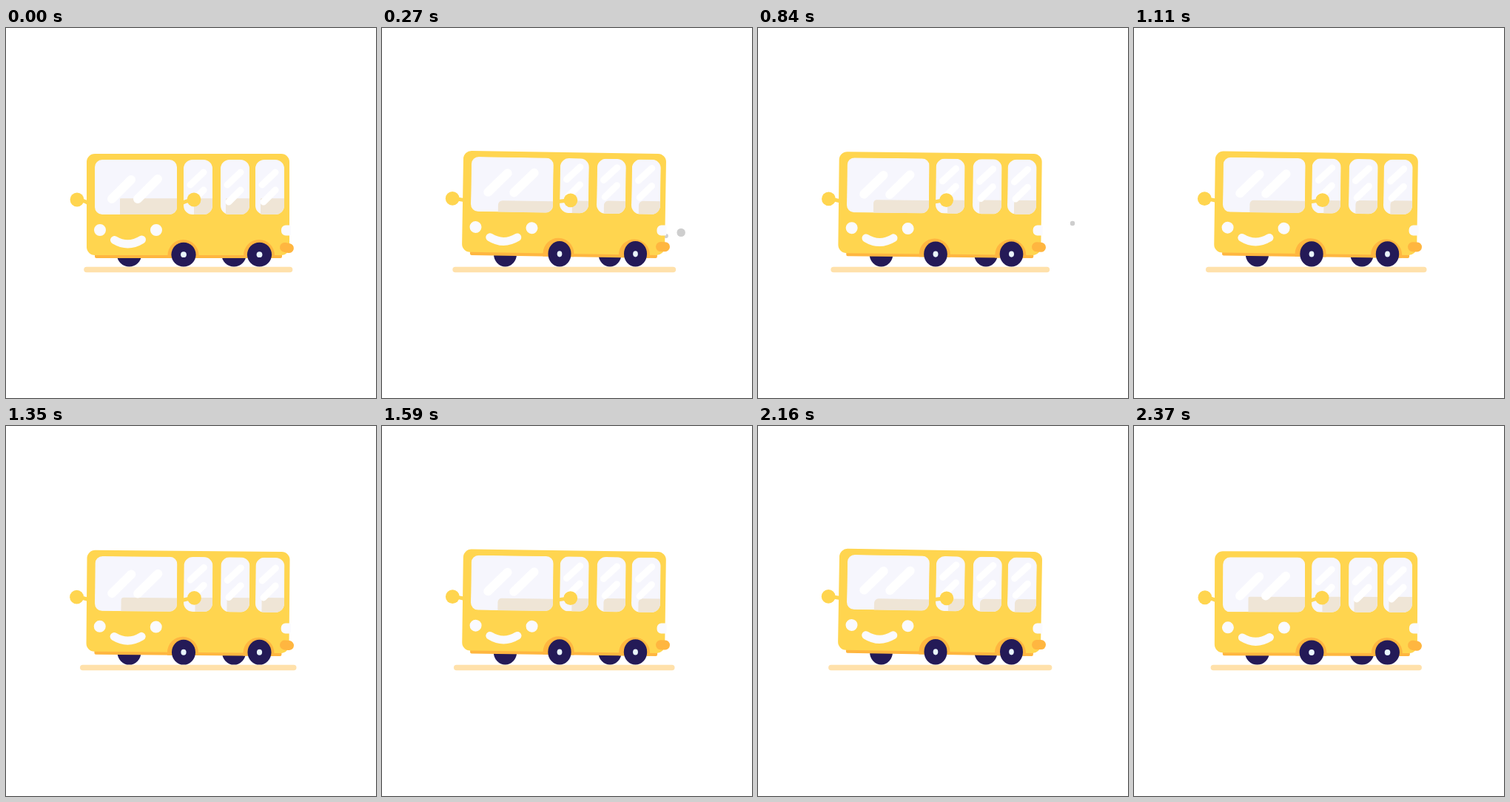
An HTML page with a canvas that plays this animation: 500x500 px, repeating every 2400 ms.

```html
<!DOCTYPE html>
<html lang="en">
<head>
<meta charset="utf-8">
<title>Bouncing bus</title>
<style>
  html, body { margin: 0; width: 100%; height: 100%; overflow: hidden; background: #fff; }
  canvas { display: block; width: 500px; height: 500px; }
</style>
</head>
<body>
<canvas id="stage"></canvas>
<script>
const LOOP = 2400, BOUNCE = 480;
const YELLOW = '#ffd54f', ORANGE = '#ffb640', NAVY = '#241a57';
const GLASS = '#f6f6fd', LIGHT = '#fafafe', SEAT = '#efe5d6', GROUND = '#ffe1ab', SMOKE = '#cecece';

const canvas = document.getElementById('stage');
const ctx = canvas.getContext('2d');
const ratio = window.devicePixelRatio || 1;
canvas.width = canvas.height = 500 * ratio;

const PUFFS = [
  { start: 100, life: 650, r: 5.7, endY: 274 },
  { start: 255, life: 500, r: 3, endY: 264 },
  { start: 400, life: 650, r: 5, endY: 264 }
];

const SIDE_WINDOWS = [
  { x: 240, seat: 254 },
  { x: 290, seat: 297 },
  { x: 337, seat: 344 }
];

function ellipse(x, y, rx, ry, color) {
  ctx.fillStyle = color;
  ctx.beginPath();
  ctx.ellipse(x, y, rx, ry, 0, 0, Math.PI * 2);
  ctx.fill();
}

function circle(x, y, r, color) {
  ellipse(x, y, r, r, color);
}

function roundRect(x, y, w, h, r, color) {
  ctx.fillStyle = color;
  ctx.beginPath();
  ctx.roundRect(x, y, w, h, r);
  ctx.fill();
}

function line(x1, y1, x2, y2, width, color) {
  ctx.strokeStyle = color;
  ctx.lineWidth = width;
  ctx.lineCap = 'round';
  ctx.beginPath();
  ctx.moveTo(x1, y1);
  ctx.lineTo(x2, y2);
  ctx.stroke();
}

function curve(x1, y1, cx, cy, x2, y2, width, color) {
  ctx.strokeStyle = color;
  ctx.lineWidth = width;
  ctx.lineCap = 'round';
  ctx.beginPath();
  ctx.moveTo(x1, y1);
  ctx.quadraticCurveTo(cx, cy, x2, y2);
  ctx.stroke();
}

// Run draw in the coordinates of the tilting body
function tilted(lift, draw) {
  ctx.save();
  ctx.translate(376, 240);
  ctx.rotate(0.0165 * lift);
  ctx.translate(-376, -240);
  draw();
  ctx.restore();
}

function drawPuff(puff, t) {
  const u = (t - puff.start) / puff.life;
  if (u <= 0 || u >= 1) return;
  const travel = Math.min(1, u * 2);
  const rise = Math.sin(travel * Math.PI / 2);
  const size = Math.min(1, 2 - 2 * u);
  circle(381 + 44 * travel, 283 + (puff.endY - 283) * rise, puff.r * size, SMOKE);
}

// Tyres stretch upwards while staying on the ground
function drawWheel(x, lift, hub) {
  const ry = 16.4 + 0.9 * lift, y = 322.6 - ry;
  ellipse(x, y, 16.6 - 1.1 * lift, ry, NAVY);
  if (hub) ellipse(x, y, 3.9 - 0.6 * lift, 3.9 + 0.2 * lift, '#e9f5fd');
}

function drawArch(x) {
  ctx.fillStyle = ORANGE;
  ctx.beginPath();
  ctx.moveTo(x - 21, 311);
  ctx.lineTo(x - 21, 304);
  ctx.arc(x, 307, 21, Math.PI, 0);
  ctx.lineTo(x + 21, 311);
  ctx.fill();
}

// Seats lag behind the body and reflections run ahead of it
function drawWindow(x, w, radius, seatX, glares, width, lift) {
  ctx.save();
  ctx.beginPath();
  ctx.roundRect(x, 178, w, 74, radius);
  ctx.clip();
  ctx.fillStyle = GLASS;
  ctx.fillRect(x, 178, w, 74);
  const sag = 2.5 + 3 * (376 - x) / 256;
  roundRect(seatX + 3 * lift, 230.3 + (sag + 1) * lift, w + 40, 60, 1 + 5 * lift, SEAT);
  for (const [x1, y1, x2, y2] of glares) {
    const dy = -5.5 * lift;
    line(x1, y1 + dy, x2, y2 + dy, width, '#fff');
  }
  ctx.restore();
}

function drawBody(lift) {
  roundRect(120, 300, 253, 11, 2, ORANGE);
  roundRect(109, 170, 274, 137, 11, YELLOW);
  drawArch(239.5);
  drawArch(342);

  drawWindow(120, 111, 10, 154, [
    [143, 231, 169, 205],
    [178, 231, 205, 204]
  ], 12, lift);
  for (const { x, seat } of SIDE_WINDOWS) {
    drawWindow(x, 39, 12, seat, [
      [x + 9, 212, x + 27, 195],
      [x + 11, 235, x + 27, 219]
    ], 9, lift);
  }

  circle(127, 273, 8, LIGHT);
  circle(203, 273, 8, LIGHT);
  curve(146.5, 286.5, 165, 297.5, 183.5, 286, 11, LIGHT);
  roundRect(372, 266.5, 13, 14, [6, 2, 2, 6], LIGHT);
}

function drawMirrors(lift) {
  const leftX = 96 - 0.8 * lift, leftY = 232 - 1.6 * lift;
  curve(leftX, leftY, 103, 232 - lift, 111, 236.5 - 4 * lift, 5, YELLOW);
  circle(leftX, leftY, 9.4, YELLOW);
  const rightX = 254 + 0.9 * lift, rightY = 232 + 0.8 * lift;
  curve(rightX, rightY, 247, 232.5 + lift, 238, 236.5 - 2 * lift, 5, YELLOW);
  circle(rightX, rightY, 9.4, YELLOW);
}

function drawTailpipe(lift) {
  ctx.save();
  ctx.translate(379.5, 297 - 1.4 * lift);
  ctx.rotate(0.2 * (1 - lift));
  roundRect(-9.5, -6.5, 19, 13, 6.5, ORANGE);
  ctx.restore();
}

function draw(t) {
  const lift = Math.pow(Math.abs(Math.sin(Math.PI * t / BOUNCE)), 1.1);
  ctx.setTransform(ratio, 0, 0, ratio, 0, 0);
  ctx.fillStyle = '#fff';
  ctx.fillRect(0, 0, 500, 500);

  const spread = 10.1 * lift;
  line(109 - spread, 326.5, 383.5 + spread, 326.5, 7.5, GROUND);
  PUFFS.forEach(puff => drawPuff(puff, t));
  drawWheel(166.5, lift, false);
  drawWheel(308, lift, false);
  tilted(lift, () => drawBody(lift));
  drawWheel(240, lift, true);
  drawWheel(342.5, lift, true);
  drawTailpipe(lift);
  drawMirrors(lift);
}

const begin = performance.now();
function tick() {
  draw((performance.now() - begin) % LOOP);
  requestAnimationFrame(tick);
}
tick();
</script>
</body>
</html>
```
